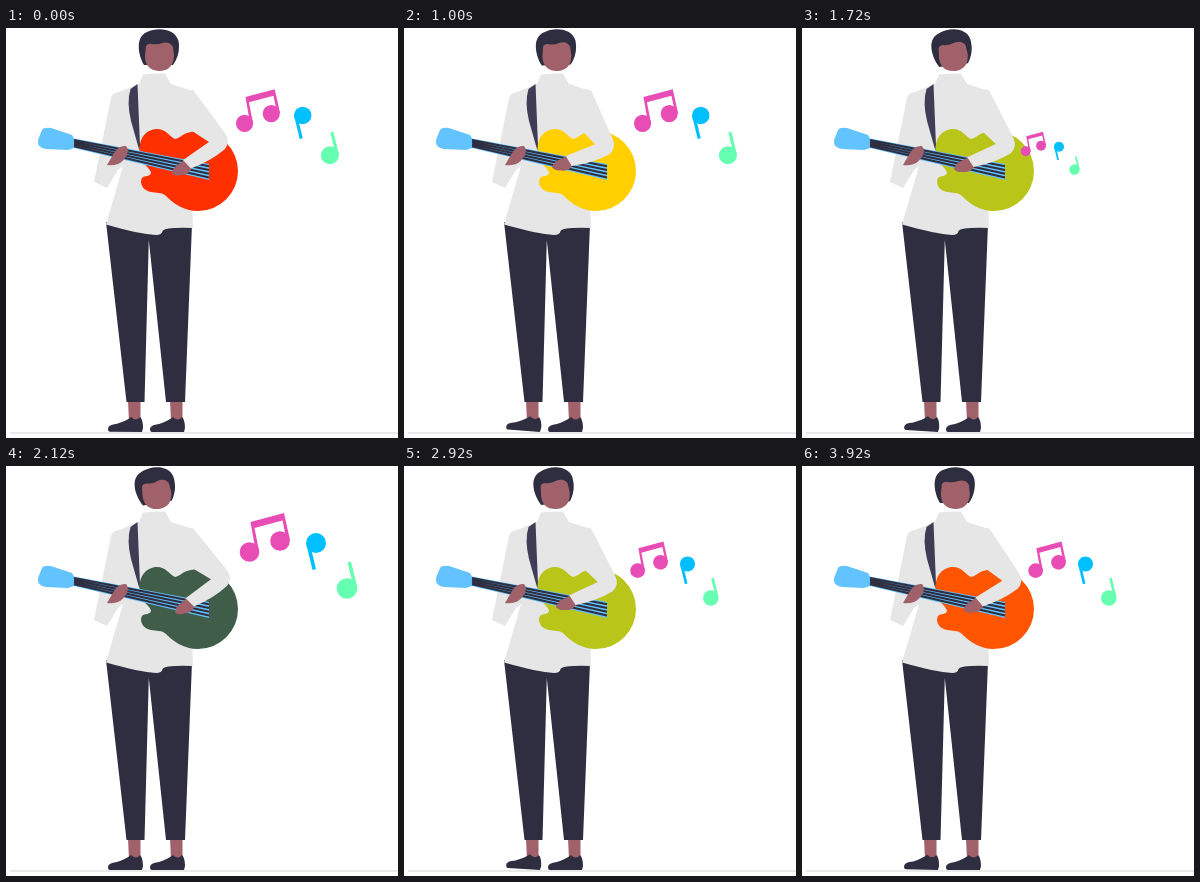
An HTML page for the animation above (4 s loop, 392 by 410 pixels).

```html
<!DOCTYPE html>
<html lang="en">
<head>
<meta charset="utf-8">
<title>Guitar player</title>
<style>
  html, body { margin: 0; width: 100%; height: 100%; overflow: hidden; background: #fff; }
  svg { display: block; width: 100vw; height: 100vh; }
</style>
</head>
<body>
<svg viewBox="0 0 392 410">
  <path d="M4 405H392" stroke="#e2e2e2" stroke-width="1.6"/>

  <g fill="#a0616a">
    <path d="M122 372H134.500V394H123Z"/>
    <path d="M164 372H176.500V394H165Z"/>
  </g>
  <g fill="#2f2e41">
    <path id="foot" d="M102 401Q102 397 111 396Q120 393 125 389Q130 394 134 389Q137 392 137 400L136 404H104Q102 404 102 401Z"/>
    <path d="M144 401Q144 397 153 396Q162 393 167 389Q172 394 176 389Q179 392 179 400L178 404H146Q144 404 144 401Z"/>
    <path d="M100 194L120.500 374H138.500L142.800 212L160 374H179L186 196Z"/>
  </g>

  <path fill="#e6e6e6" d="M137 46.500Q148 45 159 45.500L165 56L187 63L185 140L187 200Q159 199 156.500 203Q156 207 150 207Q133 206 100 196.500L117 138L112 142L101 160L88 154L105 70Q106 65 113 64L133 56Z"/>
  <path fill="#3f3d56" d="M131.500 56L124.500 61Q120.500 74 125 93L133.500 123L134 118Z"/>

  <path id="guitar" d="M134 124C132 110 141 101 151 101C160 101 163 108 169 111C174 110 177 106 181 105Q187 103 192 103A40 40 0 1 1 192 183C178 183 168 176 160 168C156 164 150 165 145 164C137 163 133 155 136 150C139 147 144 149 145 145C145 140 134 136 134 124Z"/>
  <path fill="#62c3ff" d="M68 110.500L203 136V152L68 120L62 122L40 121Q31 120 32 112L36 102Q38 99 45 100L66 107Z"/>
  <path id="frets" stroke="#2f2e41" stroke-width="2.100"/>
  <path fill="#a0616a" d="M101 137L108 125Q113 117 120 118Q123 121 121 127Q117 134 112 136Q106 138 101 137Z"/>

  <g id="arm">
    <path fill="#a0616a" d="M166 146Q166 140 173 136L180 130L186 140Q182 147 176 147Q170 149 166 146Z"/>
    <path fill="#e6e6e6" d="M187 62L219 105Q225 113 219 121Q205 133 185 140.500L177 132L203 114L183 101L168 85V64Z"/>
  </g>

  <g id="head">
    <path fill="#2f2e41" d="M138 37C132 27 129 9 141 4C151 -1 169 0 172.500 13C174 22 172 30 167 37Z"/>
    <path fill="#a0616a" d="M140 18Q142 15 146 16Q152 17 156 15Q164 13 167 19L168 28Q167 43 153 43Q139 42 139 28Z"/>
  </g>

  <g id="notes">
    <g fill="#e84cb5">
      <circle cx="243.500" cy="86" r="9.800"/>
      <circle cx="274" cy="75" r="9.800"/>
      <path d="M244.500 56L278 47L284 74L281 76L276.500 54.500L248.500 62L253 85L250 87Z"/>
    </g>
    <g fill="#00bfff">
      <circle cx="310" cy="77" r="10"/>
      <path d="M300.500 79L304 78L310 103L306.500 104Z"/>
    </g>
    <g fill="#66ffb2">
      <circle cx="341" cy="122.500" r="10.300"/>
      <path d="M341.500 96.500L345 95.500L351.300 121L348 123Z"/>
    </g>
  </g>
</svg>
<script>
  const LOOP = 4000, STEP = 100, START = 300;
  const RED = [255, 0, 0], YELLOW = [255, 255, 0], SLATE = [47, 79, 79];
  const el = id => document.getElementById(id);
  const parts = {};
  for (const id of ['foot', 'guitar', 'arm', 'head', 'notes']) parts[id] = el(id);

  let strings = '';
  for (let i = 0; i < 4; i++) strings += `M68 ${112 + i * 2.1}L203 ${138.2 + i * 3.8}`;
  el('frets').setAttribute('d', strings);

  // cubic-bezier(.42, 0, .58, 1)
  function ease(x) {
    let lo = 0, hi = 1, s = 0.5;
    for (let i = 0; i < 24; i++) {
      s = (lo + hi) / 2;
      const bx = 3 * s * (1 - s) * (0.42 * (1 - s) + 0.58 * s) + s ** 3;
      if (bx < x) lo = s; else hi = s;
    }
    return s * s * (3 - 2 * s);
  }

  const mod = (a, n) => ((a % n) + n) % n;
  const mix = (a, b, k) => `rgb(${a.map((v, i) => Math.round(v + (b[i] - v) * k))})`;
  const turn = (part, deg, x, y) => part.setAttribute('transform', `rotate(${deg} ${x} ${y})`);

  // Ten poses a second; odd ones begin 20 ms late.
  function poseTime(t) {
    const k = Math.floor(t / STEP);
    return (k % 2 && t - k * STEP < 20 ? k - 1 : k) * STEP;
  }

  function draw(ms) {
    const t = mod(poseTime(mod(ms, LOOP)) - START, LOOP);
    const u = (t < 2000 ? t : LOOP - t) / 1000;
    const swing = ease(u < 1 ? u : 2 - u);
    const nod = ease(u / 2);
    const grow = (t % 1000) / 800;

    turn(parts.arm, 20.4 * (swing - 0.187), 187, 62);
    turn(parts.foot, 6 * swing - 0.6, 136, 403);
    turn(parts.head, -10 * (nod - 0.05), 153, 44);
    parts.guitar.setAttribute('fill', u < 1 ? mix(RED, YELLOW, ease(u)) : mix(YELLOW, SLATE, ease(u - 1)));
    parts.notes.setAttribute('transform', `translate(204 160.500) scale(${grow}) translate(-204 -160.500)`);
  }

  const begin = performance.now();
  function tick() {
    draw(performance.now() - begin);
    requestAnimationFrame(tick);
  }
  tick();
</script>
</body>
</html>
```
